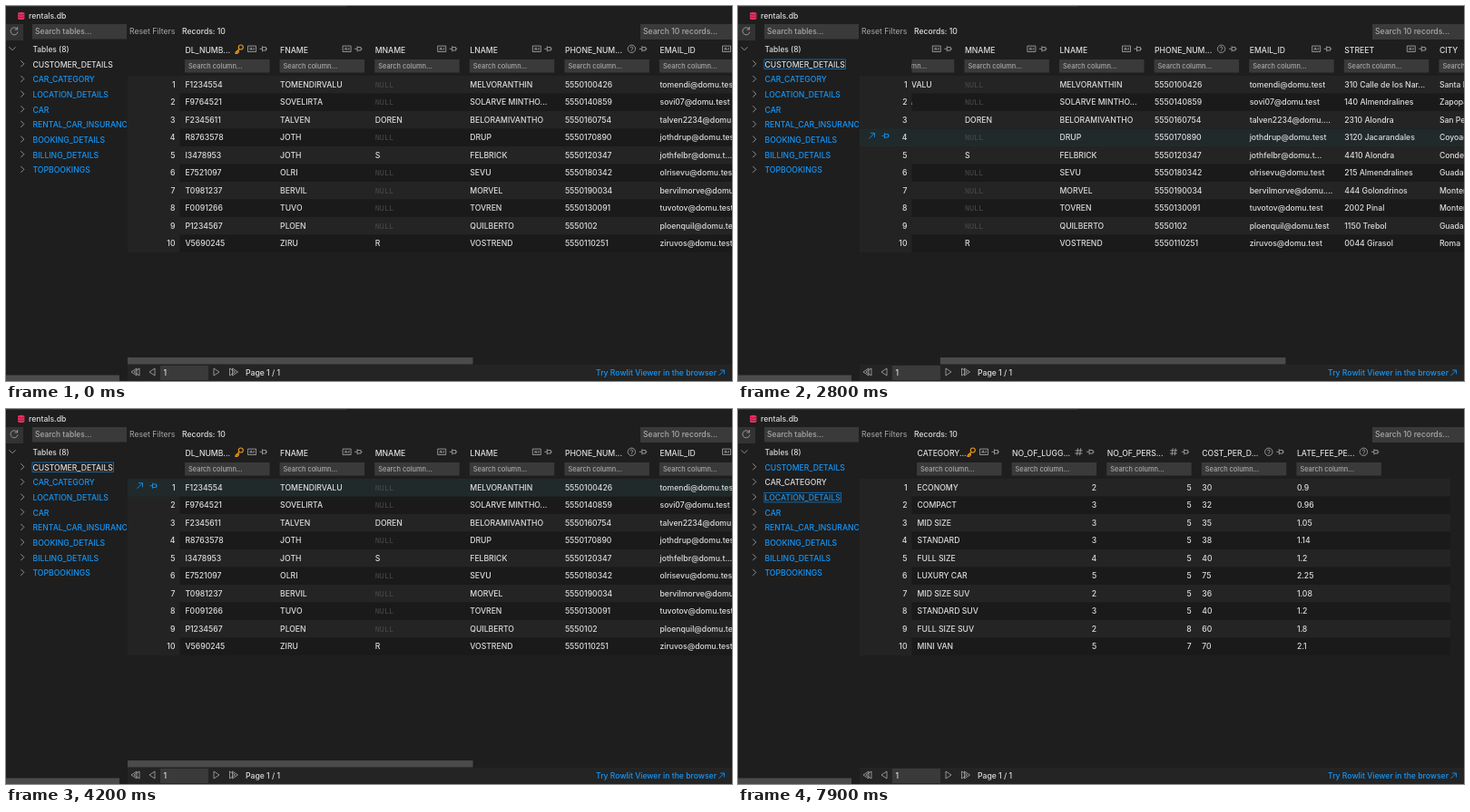
Animation of 800 by 414 pixels, one loop 8 s. Source, as an HTML page:

```html
<!DOCTYPE html>
<html lang="en">
<head>
<meta charset="utf-8">
<title>Database viewer</title>
<style>
  html, body { margin: 0; width: 100%; height: 100%; overflow: hidden; background: #1e1e1e; }
  svg { display: block; width: 800px; height: 414px; }
  text { font: 500 8.65px Inter, "Open Sans", sans-serif; fill: #dcdcdc; white-space: pre; }
  .hint { font-size: 7.4px; fill: #a8a8a8; }
  .dim { fill: #a8a8a8; }
  .null { font: 8.5px "Liberation Mono", monospace; fill: #4a4a4a; }
  .link { fill: #1496f8; }
  .icon { fill: none; stroke: #a6a6a6; stroke-width: .85; }
  .blue { stroke: #1496f8; }
  .key { stroke: #e8951c; stroke-width: 1.2; }
</style>
</head>
<body>
<svg id="stage" viewBox="0 0 800 414">
  <defs>
    <clipPath id="cells"><rect x="191.5" y="38" width="608.5" height="240"/></clipPath>
    <clipPath id="side"><rect width="133" height="414"/></clipPath>
  </defs>
</svg>
<script>
const stage = document.getElementById('stage');
const LOOP = 8000, COLUMN = 104.6, FIRST = 197.5, ROW = 19.5, TOP = 77;

function add(parent, tag, attrs, content) {
  const node = document.createElementNS('http://www.w3.org/2000/svg', tag);
  for (const name in attrs) node.setAttribute(name, attrs[name]);
  if (content !== undefined) node.textContent = content;
  parent.append(node);
  return node;
}
const group = (parent, attrs = {}) => add(parent, 'g', attrs);
const rect = (parent, x, y, width, height, fill) => add(parent, 'rect', { x, y, width, height, fill });
const label = (parent, x, middle, content, cls = '', anchor = 'start') =>
  add(parent, 'text', { x, y: middle + 3.1, class: cls, 'text-anchor': anchor }, content);
const show = (node, visible) => node.setAttribute('visibility', visible ? 'inherit' : 'hidden');

const ICONS = {
  pin: 'M-4.5 0H-1.5M-1.5 -3V3M-1.5 -1.8H2.5M-1.5 1.8H2.5M2.5 -1.8V1.8M2.5 0H4',
  abc: 'M-4.5 -3.2H4.5V3.2H-4.5ZM-2.8 .8H-1M-.6 .8H.9M1.4 .8H3M-2.4 -.6H-1M-.6 -1.6V.8M1.4 -.6H3',
  hash: 'M-1 -4L-2 4M2 -4L1 4M-4 -1.5H4M-4.3 1.7H3.7',
  help: 'M4.2 0A4.2 4.2 0 1 1 -4.2 0A4.2 4.2 0 1 1 4.2 0M-1.4 -1A1.4 1.4 0 1 1 0 .6V1.2M0 2V2.8',
  key: 'M4.3 -1.8A2.5 2.5 0 1 1 -.7 -1.8A2.5 2.5 0 1 1 4.3 -1.8M0 0L-4 4V5H-2V3.5H-.6V2',
  open: 'M-3 3L3 -3M-1.5 -3H3V1.5',
  right: 'M-1.7 -3.5L1.8 0L-1.7 3.5',
  down: 'M-3.5 -1.7L0 1.8L3.5 -1.7',
  prev: 'M3 -4V4L-3 0Z',
  next: 'M-3 -4V4L3 0Z',
  first: 'M1.5 -4V4L-4.5 0ZM4.5 -4V4L-1.5 0Z',
  last: 'M-1.5 -4V4L4.5 0ZM-4.5 -4V4L1.5 0Z',
  reload: 'M3.4 -2.4A4 4 0 1 0 4 .5M3.6 -5V-2H.6'
};
const icon = (parent, name, x, y, cls = '') =>
  add(parent, 'path', { d: ICONS[name], transform: `translate(${x} ${y})`, class: 'icon ' + cls });

const words = list => list.split('|');
const customers = [
  ['DL_NUMB...', 'abc', words('F1234554|F9764521|F2345611|R8763578|I3478953|E7521097|T0981237|F0091266|P1234567|V5690245')],
  ['FNAME', 'abc', words('TOMENDIRVALU|SOVELIRTA|TALVEN|JOTH|JOTH|OLRI|BERVIL|TUVO|PLOEN|ZIRU')],
  ['MNAME', 'abc', words('||DOREN||S|||||R')],
  ['LNAME', 'abc', words('MELVORANTHIN|SOLARVE MINTHO...|BELORAMIVANTHO|DRUP|FELBRICK|SEVU|MORVEL|TOVREN|QUILBERTO|VOSTREND')],
  ['PHONE_NUM...', 'help', words('5550100426|5550140859|5550160754|5550170890|5550120347|5550180342|5550190034|5550130091|5550102|5550110251')],
  ['EMAIL_ID', 'abc', words('tomendi@domu.test|sovi07@domu.test|talven2234@domu....|jothdrup@domu.test|jothfelbr@domu.t...|olrisevu@domu.test|bervilmorve@domu....|tuvotov@domu.test|ploenquil@domu.test|ziruvos@domu.test')],
  ['STREET', 'abc', words('310 Calle de los Nar...|140 Almendralines|2310 Alondra|3120 Jacarandales|4410 Alondra|215 Almendralines|444 Golondrinos|2002 Pinal|1150 Trebol|0044 Girasol')],
  ['CITY', 'abc', words('Santa Fe|Zapopan|San Pedro|Coyoacan|Condesa|Guadalajara|Monterrey|Monterrey|Guadalajara|Roma')],
  ['STATE', 'abc', words('Ciudad de Mexico|Jalisco|Nuevo Leon|Ciudad de Mexico|Ciudad de Mexico|Jalisco|Nuevo Leon|Nuevo Leon|Jalisco|Ciudad de Mexico')]
];
const categories = [
  ['CATEGORY...', 'abc', words('ECONOMY|COMPACT|MID SIZE|STANDARD|FULL SIZE|LUXURY CAR|MID SIZE SUV|STANDARD SUV|FULL SIZE SUV|MINI VAN')],
  ['NO_OF_LUGG...', 'hash', [...'2333452325']],
  ['NO_OF_PERS...', 'hash', [...'5555555587']],
  ['COST_PER_D...', 'help', words('30|32|35|38|40|75|36|40|60|70')],
  ['LATE_FEE_PE...', 'help', words('0.9|0.96|1.05|1.14|1.2|2.25|1.08|1.2|1.8|2.1')]
];

function buildTable(columns, width) {
  const root = group(stage);
  for (let i = 0; i < 10; i++) rect(root, 134, TOP + i * ROW, width, ROW, i % 2 ? '#1a1a1a' : '#242424');
  rect(root, 134, TOP, 57.5, 10 * ROW, '#232323');
  const hover = rect(root, 134, TOP, width, ROW, '#212a2a');
  const cells = group(group(root, { 'clip-path': 'url(#cells)' }));

  columns.forEach(([name, type, values], c) => {
    const x = FIRST + c * COLUMN;
    label(cells, x, 48.5, name);
    if (!c) icon(cells, 'key', x + 59.5, 47.3, 'key');
    icon(cells, type, x + 73.5, 47.3);
    icon(cells, 'pin', x + 86.5, 47.3);
    rect(cells, x - .5, 59, 93.5, 14.5, '#3a3a3a');
    label(cells, x + 3.5, 66, 'Search column...', 'hint');
    values.forEach((value, i) => {
      const y = TOP + (i + .5) * ROW;
      if (type === 'hash') label(cells, x + 93, y, value, '', 'end');
      else label(cells, x, y, value || 'NULL', value ? '' : 'null');
    });
  });
  for (let i = 0; i < 10; i++) label(root, 186.5, TOP + (i + .5) * ROW, i + 1, '', 'end');

  const tools = group(root);
  icon(tools, 'open', 147.5, TOP + ROW / 2 - 2, 'blue');
  icon(tools, 'pin', 163, TOP + ROW / 2 - 2, 'blue');
  return { root, hover, tools, cells };
}

// Top strip and toolbar
rect(stage, 0, 0, 375, 1, '#333');
add(stage, 'path', { d: 'M13 8.2A3.7 1.5 0 0 1 20.4 8.2V13.6A3.7 1.5 0 0 1 13 13.6Z', fill: '#ee2f63' });
add(stage, 'path', { d: 'M13 9.3Q16.7 11 20.4 9.3M13 12Q16.7 13.7 20.4 12', fill: 'none', stroke: '#1e1e1e', 'stroke-width': .5 });
label(stage, 25, 11, 'rentals.db');
rect(stage, 0, 20, 19, 18, '#333');
icon(stage, 'reload', 9, 28);
rect(stage, 29, 20, 104, 16.5, '#3a3a3a');
label(stage, 32, 28, 'Search tables...', 'dim').style.fontSize = '8.4px';
label(stage, 136, 28, 'Reset Filters', 'dim').style.fontWeight = 400;
label(stage, 194, 28, 'Records: 10');
rect(stage, 699, 20, 101, 17, '#3a3a3a');
label(stage, 702, 28, 'Search 10 records...', 'dim');

// Sidebar
const side = group(stage, { 'clip-path': 'url(#side)' });
icon(side, 'down', 7, 47);
label(side, 29.5, 47.5, 'Tables (8)').style.fontSize = '8.4px';
const linkY = i => 64.5 + i * 16.65;
const links = words('CUSTOMER_DETAILS|CAR_CATEGORY|LOCATION_DETAILS|CAR|RENTAL_CAR_INSURANCE|BOOKING_DETAILS|BILLING_DETAILS|TOPBOOKINGS')
  .map((name, i) => {
    icon(side, 'right', 18, linkY(i) - .7);
    return label(side, 29.5, linkY(i), name, 'link');
  });
const focusBox = add(side, 'rect', { x: 29, height: 10.6, fill: 'none', stroke: '#1584d8', 'stroke-width': .7 });
rect(side, 0, 407.5, 125, 6.5, '#4b4b4b');

const tables = [buildTable(customers, 666), buildTable(categories, 651)];

// Footer
const thumb = rect(stage, 134, 388, 380.5, 7.5, '#4b4b4b');
rect(stage, 134, 396, 666, 18, '#242424');
rect(stage, 170, 397, 53, 16, '#3a3a3a');
label(stage, 173.5, 405.2, '1');
icon(stage, 'first', 142.5, 404);
icon(stage, 'prev', 161, 404);
icon(stage, 'next', 232, 404);
icon(stage, 'last', 251, 404);
label(stage, 264, 405.2, 'Page 1 / 1');
label(stage, 783, 405.2, 'Try Rowlit Viewer in the browser', 'link', 'end');
icon(stage, 'open', 788.5, 405, 'blue');

// Steps are [time, value]; each value holds until the next step.
const focusSteps = [[0, -1], [300, 0], [4800, 1], [7500, 2]];
const tableSteps = [[0, 0], [5300, 1]];
const hoverSteps = [[0, 0], [2100, 4], [4200, 1], [4400, 0], [5700, 2], [5900, 3], [6000, 4], [6500, 0]];
const scrollSteps = [
  [0, 0], [2200, 4], [2300, 11.8], [2500, 43], [2600, 82], [2700, 121], [2800, 156.8],
  [2900, 188], [3000, 217], [3100, 243], [3200, 264], [3300, 279], [3400, 259.2],
  [3500, 190], [3600, 120], [3700, 62], [3800, 20], [3900, 0]
];
const valueAt = (steps, time) => steps.findLast(([start]) => start <= time)[1];

function draw(now) {
  const time = now % LOOP;
  const focus = valueAt(focusSteps, time);
  const active = valueAt(tableSteps, time);
  const row = valueAt(hoverSteps, time);
  const scroll = valueAt(scrollSteps, time);

  links.forEach((link, i) => link.setAttribute('class', i === active ? '' : 'link'));
  show(focusBox, focus >= 0);
  if (focus >= 0) {
    focusBox.setAttribute('y', linkY(focus) - 5.5);
    focusBox.setAttribute('width', links[focus].getComputedTextLength() + 1);
  }

  tables.forEach((table, i) => {
    show(table.root, i === active);
    show(table.hover, row && i === active);
    show(table.tools, row && i === active);
    const shift = `translate(0 ${(row - 1) * ROW})`;
    table.hover.setAttribute('transform', shift);
    table.tools.setAttribute('transform', shift);
  });
  tables[0].cells.setAttribute('transform', `translate(${-scroll} 0)`);
  thumb.setAttribute('x', 134 + scroll * .567);
  show(thumb, active === 0);
}

const began = performance.now();
function tick() {
  draw(performance.now() - began);
  requestAnimationFrame(tick);
}
tick();
</script>
</body>
</html>
```
